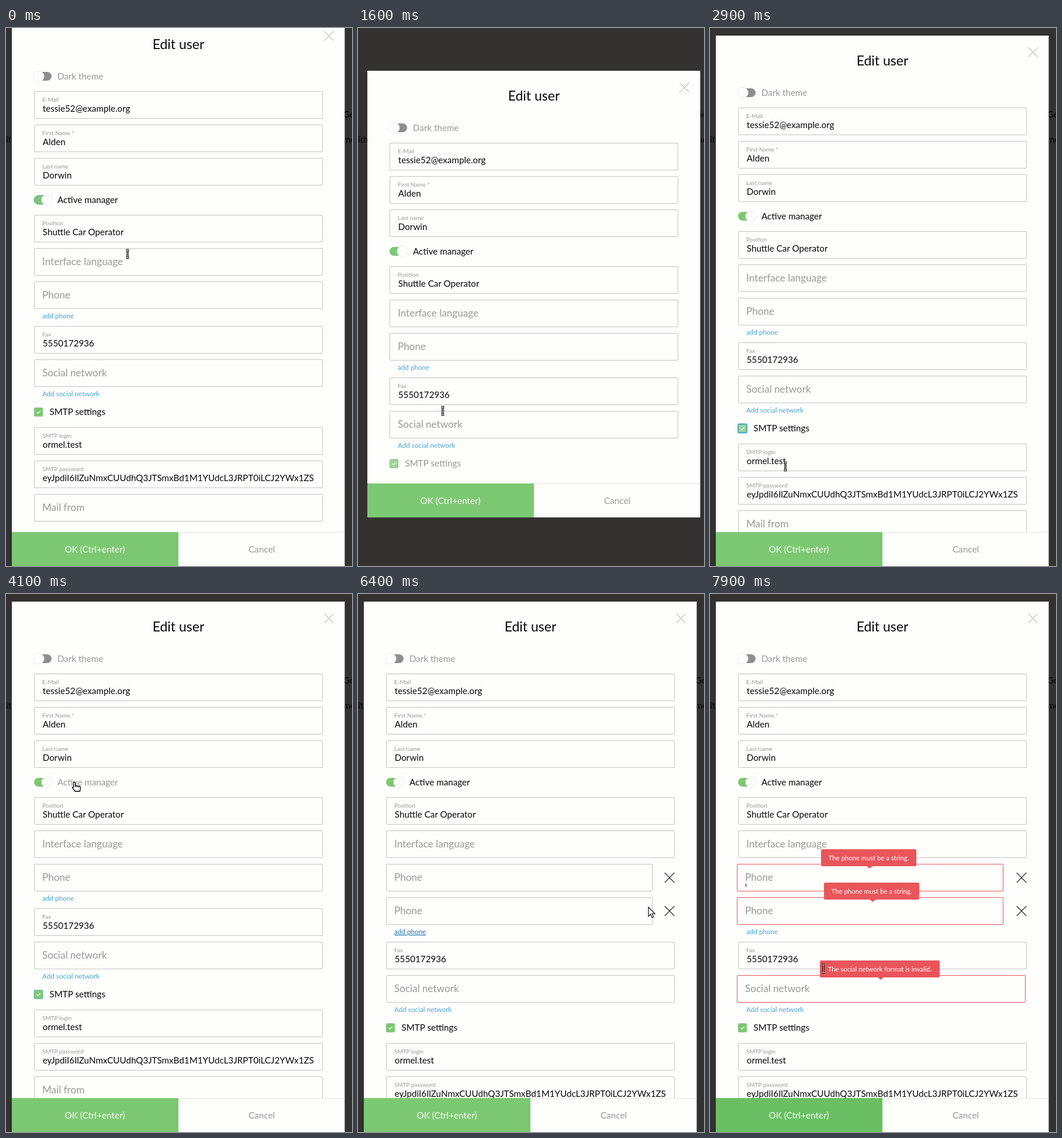
An HTML page that plays this animation: 592 px wide and 919 px high, repeating every 8000 ms.

```html
<!DOCTYPE html>
<html lang="en">
<head>
<meta charset="utf-8">
<title>Edit user</title>
<style>
html, body { margin: 0; width: 592px; height: 919px; overflow: hidden; background: #333231; }
svg { display: block; font-family: Lato, sans-serif; }
</style>
</head>
<body>
<svg id="stage" width="592" height="919"></svg>
<script>
const LOOP = 8000;
const HIDE_SMTP = 1550, SHOW_SMTP = 2800, MANAGER_OFF = 4090, MANAGER_ON = 4900;
const ADD_PHONE = 5900, PRESS_OK = 7150, ERRORS = 7800;
const GREEN = '#7dc873', GREY = '#989896', BLACK = '#080808', BLUE = '#45a3d6', RED = '#e9555b';
const PAPER = '#fefefd', DIALOG_WIDTH = 569.5, BODY = 15.2;
const PASSWORD = 'eyJpdiI6IlZuNmxCUUdhQ3JTSmxBd1M1YUdcL3JRPT0iLCJ2YWx1ZS';
const stage = document.getElementById('stage');

// time, x, y of the hotspot, pointer shape from then on
const POINTER = [
  [0, 208, 386, 'beam'], [100, 206, 362, 'beam'], [700, 116, 717, 'beam'],
  [900, 112, 692, 'beam'], [1200, 118, 662, 'hand'], [1400, 118, 662, 'hand'],
  [1550, 145, 654, 'beam'], [1600, 145, 654, 'beam'], [2300, 148, 722, 'arrow'],
  [2400, 138, 735, 'hand'], [2600, 112, 742, 'hand'], [2700, 112, 742, 'hand'],
  [2850, 129, 749, 'beam'], [2900, 129, 749, 'beam'], [3600, 121, 345, 'hand'],
  [4000, 117, 322, 'hand'], [4950, 117, 322, 'arrow'], [5200, 129, 536, 'arrow'],
  [5500, 104, 528, 'hand'], [5700, 95, 517, 'hand'], [5950, 95, 517, 'arrow'],
  [6400, 497, 535, 'arrow'], [6650, 531, 537, 'hand'], [6800, 500, 600, 'arrow'],
  [7100, 235, 885, 'hand'], [7300, 235, 885, 'hand'], [7600, 205, 760, 'beam'],
  [7900, 194, 640, 'beam'], [8000, 194, 640, 'beam']
];

const clamp = v => Math.max(0, Math.min(1, v));
const ramp = (t, start, length) => clamp((t - start) / length);

const text = (x, y, str, size, fill, extra = '') =>
  `<text x="${x}" y="${y}" font-size="${size}" fill="${fill}" ${extra}>${str}</text>`;
const rect = (x, y, w, h, fill, extra = '') =>
  `<rect x="${x}" y="${y}" width="${w}" height="${h}" fill="${fill}" ${extra}/>`;
const path = (d, stroke, width = 1, fill = 'none') =>
  `<path d="${d}" stroke="${stroke}" stroke-width="${width}" fill="${fill}"/>`;
const cross = (x, y, r, color, width) =>
  path(`M${x - r} ${y - r}l${2 * r} ${2 * r}m0 ${-2 * r}l${-2 * r} ${2 * r}`, color, width);

function field(x, y, label, value, { width = 493, error = false } = {}) {
  const frame = rect(x + .5, y + .5, width, 46, 'none',
    `rx="1.5" stroke="${error ? RED : '#c4c4c1'}"`);
  if (!value) return frame + text(x + 14, y + 29, label, 17.1, GREY);
  return frame + text(x + 14, y + 18, label, 10, GREY) +
    `<svg x="${x + 14}" y="${y + 18}" width="465" height="26">${text(.8, 17, value, BODY, BLACK)}</svg>`;
}

function toggle(x, y, label, { slide = 0, on = false, ring = false } = {}) {
  const tint = Math.round(slide * 100);
  return rect(x, y - 7.5, 30, 15, `color-mix(in srgb, ${GREEN} ${tint}%, #8e8e8e)`,
      `rx="7.5" ${ring ? 'stroke="#5a9fae"' : ''}`) +
    `<circle cx="${x + 8 + 14 * slide}" cy="${y}" r="9.2" fill="#fefefe" stroke="#e4e4e3" stroke-width=".8"/>` +
    text(x + 40, y + 5, label, BODY, on ? BLACK : GREY);
}

function checkbox(x, y, label, checked, amount, ring) {
  return rect(x + .5, y - 7, 14, 14, '#fff', `rx="1.5" stroke="#b5b5b2"`) +
    `<g opacity="${amount}">` + rect(x, y - 7.5, 15, 15, GREEN, 'rx="1.5"') +
    path(`M${x + 4.5} ${y}l2.2 2.2 4.3-4.3`, '#fff', 1.1) + '</g>' +
    (ring ? rect(x, y - 7.5, 15, 15, 'none', `rx="1.5" stroke="${BLUE}" stroke-width="${ring}"`) : '') +
    text(x + 26.5, y + 5, label, BODY, checked ? BLACK : GREY);
}

const link = (x, y, label, active) =>
  text(x, y + 4, label, 11.7, active ? '#2272ad' : BLUE, active ? 'text-decoration="underline"' : '');

const tooltip = (x, y, width, tip, message) =>
  rect(x, y, width, 29, RED, 'rx="2"') +
  `<path d="M${tip - 5} ${y + 29}h10l-5 4z" fill="${RED}"/>` +
  text(x + width / 2, y + 19, message, 11.3, '#fff', 'text-anchor="middle"');

function pointer(t) {
  const i = POINTER.findLastIndex(key => key[0] <= t);
  const [t0, x0, y0, shape] = POINTER[i];
  const [t1, x1, y1] = POINTER[i + 1];
  const k = ramp(t, t0, t1 - t0), s = k * k * (3 - 2 * k);
  const x = x0 + (x1 - x0) * s, y = y0 + (y1 - y0) * s;
  const beam = 'M-2.5-6.5h5M0-6.5v13M-2.5 6.5h5';
  const art = {
    beam: path(beam, '#000', 3.4) + path(beam, '#fff', 1),
    arrow: path('M0 0v15.5l3.6-3.4 2.5 5.7 2.6-1.1-2.5-5.5h4.9z', '#111', 1.2, '#fff'),
    hand: path('M-1.5 1q0-1.8 1.5-1.8T1.5 1v4.2l7 1.3q2 .5 2 2.5l-1 6H1L-3.5 9q-.5-2 2-.8z', '#000', 1.3, '#fff') +
      path('M1.5 5v3M4 6v2.3M6.7 6.5v2.2', '#000', .9)
  };
  return `<g transform="translate(${x} ${y})">${art[shape]}</g>`;
}

function scene(t) {
  const small = t >= HIDE_SMTP && t < SHOW_SMTP;
  const left = small ? 16 : 10;
  const top = small ? 74 : t < HIDE_SMTP ? -14 : 14;
  const footer = small ? 778 : 861;
  const x = left + 38, at = dy => top + dy;

  const two = t >= ADD_PHONE, push = two ? 57 : 0;
  const error = t >= ERRORS;
  const shake = error ? -2 * Math.sin((t - ERRORS) / 100 * Math.PI / 2) : 0;
  const phone = { width: two ? 455 : 493, error };

  const checked = !small;
  const checkAmount = t < SHOW_SMTP ? 1 - ramp(t, HIDE_SMTP, 200) : ramp(t, SHOW_SMTP - 50, 200);
  const checkRing = t < SHOW_SMTP || t > 4200 ? 0 : t < 3200 ? 1.8 : .6;
  const manager = {
    on: t < MANAGER_OFF || t >= MANAGER_ON,
    slide: t < MANAGER_ON ? 1 - ramp(t, MANAGER_OFF + 30, 200) : ramp(t, MANAGER_ON, 200),
    ring: t < HIDE_SMTP || (t > 4150 && t < ADD_PHONE)
  };
  const linkActive = t > 5600 && t < PRESS_OK;

  let form = text(left + 285, at(50), 'Edit user', 23, BLACK, 'text-anchor="middle"') +
    cross(left + 542.5, at(27.5), 8, '#999f98', 1) +
    toggle(x, at(96.5), 'Dark theme') +
    field(x, at(122), 'E-Mail', 'tessie52@example.org') +
    field(x, at(179), 'First Name *', 'Alden') +
    field(x, at(236), 'Last name', 'Dorwin') +
    toggle(x, at(307.5), 'Active manager', manager) +
    field(x, at(333), 'Position', 'Shuttle Car Operator') +
    field(x, at(390), 'Interface language') +
    field(x + shake, at(447), 'Phone', '', phone);
  if (two) {
    form += field(x + shake, at(504), 'Phone', '', phone) +
      cross(533, at(470.5), 8.3, '#111', 1.2) + cross(533, at(527.5), 8.3, '#111', 1.2);
  }
  form += link(x + 14, at(506 + push), 'add phone', linkActive) +
    field(x, at(523 + push), 'Fax', '5550172936') +
    field(x + shake, at(580 + push), 'Social network', '', { error }) +
    link(x + 14, at(639 + push), 'Add social network', false) +
    checkbox(x, at(670 + push), 'SMTP settings', checked, checkAmount, checkRing);
  if (!small) {
    form += field(x, at(696 + push), 'SMTP login', 'ormel.test') +
      field(x, at(753 + push), 'SMTP password', PASSWORD) +
      field(x, at(810 + push), 'Mail from');
  }
  if (error) {
    form += path('M61.5 495v5', BLACK) +
      tooltip(190, 436, 163, 273, 'The phone must be a string.') +
      tooltip(195, 493, 163, 278.5, 'The phone must be a string.') +
      tooltip(188, 626, 205, 292, 'The social network format is invalid.');
  }

  const behind = text(0, 196, 'ith', 15, '#050505') +
    text(577, 153, 'Ge', 15, '#050505') + text(577, 196, 'me', 15, '#050505');
  const buttons = rect(left, footer, DIALOG_WIDTH, 58, PAPER) +
    rect(left, footer, DIALOG_WIDTH, 1, '#e4e4e2') +
    rect(left, footer, 285, 58, t >= PRESS_OK ? '#69bf62' : GREEN) +
    text(left + 142, footer + 35, 'OK (Ctrl+enter)', 15.3, '#f4fbf2', 'text-anchor="middle"') +
    text(left + 427.5, footer + 35, 'Cancel', 15.3, GREY, 'text-anchor="middle"');

  return rect(0, 0, 592, 919, '#333231') + behind +
    rect(left, top - 1, DIALOG_WIDTH, footer - top + 1, PAPER) +
    `<svg width="592" height="${footer}">${form}</svg>` + buttons + pointer(t);
}

function draw() {
  stage.innerHTML = scene(performance.now() % LOOP);
  requestAnimationFrame(draw);
}
draw();
</script>
</body>
</html>
```
